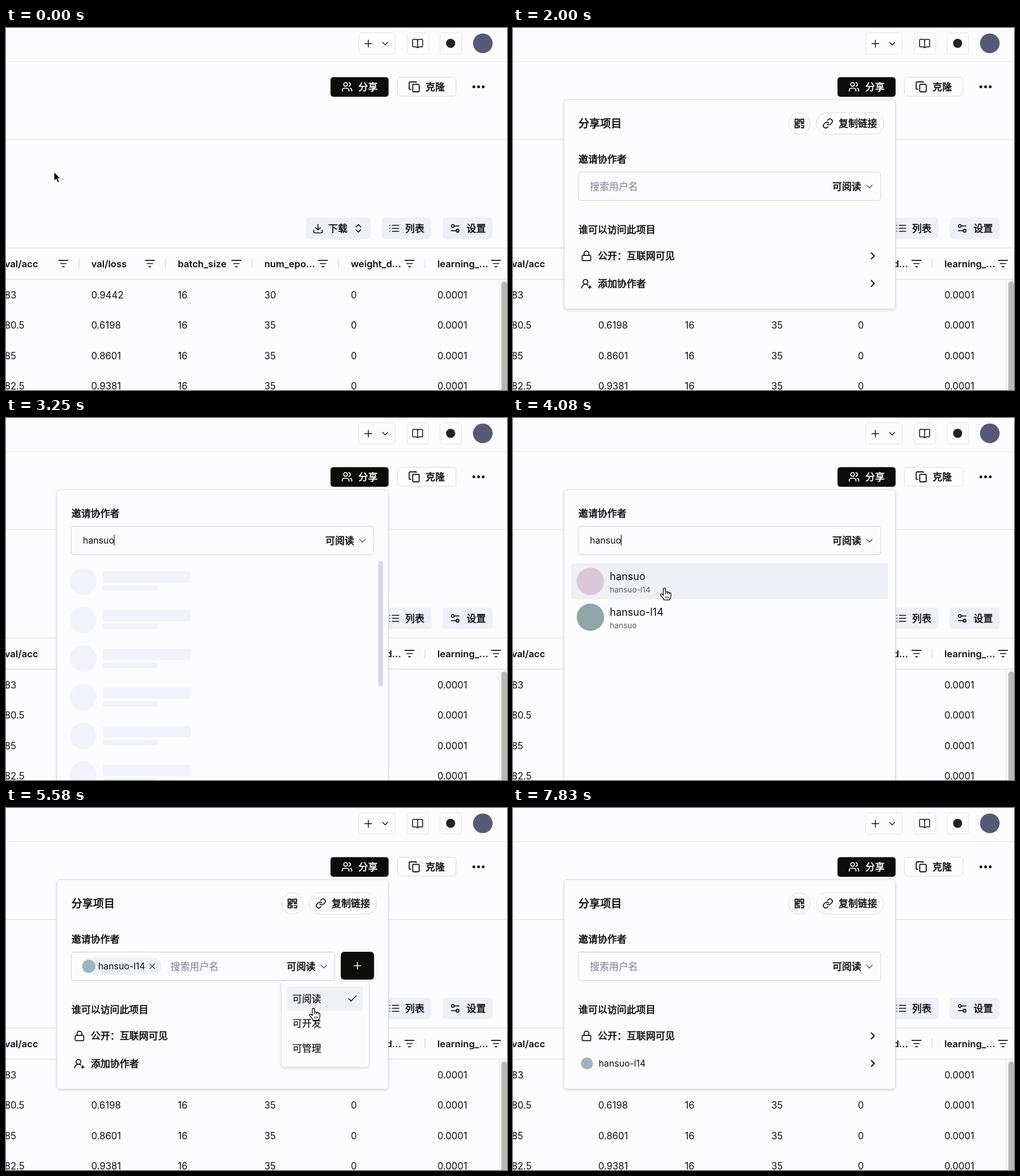
An HTML page that plays this animation: 880x637 px, repeating every 8410 ms.

```html
<!DOCTYPE html>
<html lang="zh-CN">
<head>
<meta charset="utf-8">
<title>分享项目</title>
<style>
html, body { margin: 0; width: 100%; height: 100%; overflow: hidden; background: #fcfcfe; }
svg { display: block; position: fixed; left: 0; top: 0; }
text { font-family: Inter, "Noto Sans CJK SC", "Noto Sans CJK", sans-serif; white-space: pre; }
.pop { filter: drop-shadow(0 2px 2px rgba(40, 40, 90, .15)); }
</style>
</head>
<body>
<svg id="stage" width="880" height="637" viewBox="0 0 880 637" lang="zh-CN"></svg>
<script>
const LOOP = 8410, STEP = 1000 / 12;
const USER = 'hansuo', USER2 = 'hansuo-l14';
const INK = '#101014', EDGE = '#d9d7e6', SOFT = '#efeff7', GREY = '#8b8b9f', BG = '#fcfcfe', BONE = '#f2f2fc';

const ICONS = {
  plus: 'M5 12h14M12 5v14',
  down: 'M6 9l6 6 6-6',
  right: 'M9 18l6-6-6-6',
  cross: 'M18 6L6 18M6 6l12 12',
  check: 'M20 6L9 17l-5-5',
  book: 'M12 6v14M3 19a1 1 0 0 1-1-1V5a1 1 0 0 1 1-1h6a3 3 0 0 1 3 3 3 3 0 0 1 3-3h6a1 1 0 0 1 1 1v13a1 1 0 0 1-1 1h-6l-3 2-3-2z',
  users: 'M16 21v-2a4 4 0 0 0-4-4H6a4 4 0 0 0-4 4v2M5 7a4 4 0 1 0 8 0a4 4 0 1 0-8 0M22 21v-2a4 4 0 0 0-3-3.9M16 3.1a4 4 0 0 1 0 7.8',
  userAdd: 'M2 21a8 8 0 0 1 13.3-6M5 8a5 5 0 1 0 10 0a5 5 0 1 0-10 0M19 16v6M22 19h-6',
  clone: 'M11 7h9a2 2 0 0 1 2 2v11a2 2 0 0 1-2 2h-9a2 2 0 0 1-2-2V9a2 2 0 0 1 2-2zM5 17H4a2 2 0 0 1-2-2V4a2 2 0 0 1 2-2h12v1',
  load: 'M21 15v4a2 2 0 0 1-2 2H5a2 2 0 0 1-2-2v-4M7 10l5 5 5-5M12 15V3',
  sort: 'M7 15l5 5 5-5M7 9l5-5 5 5',
  list: 'M8 6h13M8 12h13M8 18h13M3 6h.1M3 12h.1M3 18h.1',
  tune: 'M20 7h-10M14 17H4M14 17a3 3 0 1 0 6 0a3 3 0 1 0-6 0M4 7a3 3 0 1 0 6 0a3 3 0 1 0-6 0',
  link: 'M10 13a5 5 0 0 0 7.5.5l3-3a5 5 0 0 0-7-7l-1.8 1.7M14 11a5 5 0 0 0-7.5-.5l-3 3a5 5 0 0 0 7 7l1.8-1.7',
  lock: 'M5 11h14a2 2 0 0 1 2 2v7a2 2 0 0 1-2 2H5a2 2 0 0 1-2-2v-7a2 2 0 0 1 2-2zM7 11V7a5 5 0 0 1 10 0v4',
  filter: 'M2 5h20M6 12h12M10 19h4',
  grid: 'M3 3h6v6H3zM15 3h6v6h-6zM3 15h6v6H3zM12 3v6M3 12h9M12 16v5M16 12h5M16 16h2M21 16v5h-5'
};

const rect = (x, y, w, h, r, fill, stroke = 'none', extra = '') =>
  `<rect x="${x}" y="${y}" width="${w}" height="${h}" rx="${r}" fill="${fill}" stroke="${stroke}" ${extra}/>`;
const disc = (x, y, r, fill, stroke = 'none') =>
  `<circle cx="${x}" cy="${y}" r="${r}" fill="${fill}" stroke="${stroke}"/>`;
// y is the middle of the line; a thin outline gives Chinese text its medium weight
const text = (x, y, s, size = 16.9, weight = 500, fill = INK, id = '') => {
  const han = /[\u4e00-\u9fff]/.test(s);
  const bold = han ? `font-weight="400" stroke="${fill}" stroke-width="${weight > 400 ? size * .035 : .2}"` : `font-weight="${weight}"`;
  return `<text x="${x}" y="${(y + size * .365).toFixed(1)}" font-size="${size}" ${bold} fill="${fill}" ${id && `id="${id}"`}>${s}</text>`;
};
const icon = (name, x, y, size = 20, stroke = INK, line = 1.7) => {
  const k = size / 24;
  return `<path d="${ICONS[name]}" transform="translate(${x - size / 2} ${y - size / 2}) scale(${k})" fill="none" stroke="${stroke}" stroke-width="${line / k}" stroke-linecap="round" stroke-linejoin="round"/>`;
};
const group = (id, body, cls = '') => `<g id="${id}" class="${cls}">${body}</g>`;
const line = (y, c) => rect(0, y, 880, 1, 0, c);

function page() {
  let s = line(58.5, '#e3e3ea') + line(195.5, '#dddae0') + line(386.5, '#dcdce4') + line(441.5, '#d6d4e6');
  for (const [x, w] of [[619.5, 64], [704.5, 38], [762.5, 38]]) s += rect(x, 8.5, w, 37.5, 5, BG, '#e2e1ec');
  s += icon('plus', 636.5, 27.5, 21, INK, 1.5) + icon('down', 666, 27.5, 18, INK, 1.4);
  s += icon('book', 723, 27, 21, INK, 1.5) + disc(781, 27, 8, '#222226') + disc(837.5, 27, 17.3, '#565a78');
  s += rect(570, 86.5, 102, 34.5, 5, '#0c0c0a') + icon('users', 599, 103.5, 20, '#fff') + text(619, 103.5, '分享', 16.9, 500, '#fff');
  s += rect(687.5, 86.5, 103, 33.5, 6, BG, EDGE) + icon('clone', 717, 103.5, 21, INK, 1.8) + text(737, 103.5, '克隆');
  for (const x of [821.8, 830, 838.2]) s += disc(x, 103.5, 2.5, INK);

  for (const [x, w] of [[527, 113.5], [660, 87.5], [767, 87.5]]) s += rect(x, 333.5, w, 38, 6, SOFT);
  s += icon('load', 548, 353, 20) + text(566, 352.5, '下载') + icon('sort', 619, 352.5, 20);
  s += icon('list', 682, 352.5, 21) + text(701, 352.5, '列表') + icon('tune', 789, 352.5, 20) + text(809, 352.5, '设置');

  const heads = ['val/acc', 'val/loss', 'batch_size', 'num_epo...', 'weight_d...', 'learning_...'];
  const cells = [
    ['83', '80.5', '85', '82.5'], ['0.9442', '0.6198', '0.8601', '0.9381'],
    ['16', '16', '16', '16'], ['30', '35', '35', '35'],
    ['0', '0', '0', '0'], ['0.0001', '0.0001', '0.0001', '0.0001']
  ];
  heads.forEach((h, i) => {
    const x = -2.3 + i * 152;
    s += text(x, 415, h, 16.6, 600) + icon('filter', x + 103, 414.5, 19);
    if (i < 5) s += rect(x + 129.5, 406.5, 1.4, 16, 0, '#d5d4dc');
    cells[i].forEach((c, j) => s += text(x, 469.5 + j * 53.5, c, 16.6, 400));
  });
  return s + rect(865.5, 443, 1, 194, 0, '#dddbe6') + rect(870, 446, 10, 220, 5, '#b8b8b2');
}

const picker = (x, y, id) => text(x, y, '可阅读', 16.9, 500, INK, id) + icon('down', x + 65, y + .5, 20, '#55555f', 1.4);
const field = (y, w) => rect(114.5, y, w, 50, 5, BG, '#cfcbe0');
const card = h => rect(89.5, 126, 582, h, 6, BG, EDGE);

function sharePanel() {
  const body = group('card', card(368.5), 'pop')
    + text(115, 168, '分享项目', 19)
    + disc(503, 168, 18.8, BG, EDGE) + icon('grid', 503, 168, 20, INK, 1.8)
    + rect(533, 149, 118, 38, 19, BG, EDGE) + icon('link', 553, 168, 20) + text(572, 168, '复制链接')
    + text(115, 230.5, '邀请协作者')
    + text(115, 355, '谁可以访问此项目')
    + icon('lock', 129, 401, 20) + text(149, 401, '公开：互联网可见')
    + icon('right', 632, 401, 21, INK, 1.9) + icon('right', 632, 449.5, 21, INK, 1.9);
  const empty = field(253.5, 531.5) + text(135, 278.5, '搜索用户名', 16.9, 400, GREY, 'hint')
    + text(135, 278.5, '', 15.9, 400, INK, 'typed') + picker(561, 278.5, 'role');
  const filled = field(253.5, 463) + rect(131, 264, 142, 29, 14.5, SOFT) + disc(145.5, 278.5, 11.5, '#9db4ba')
    + text(162, 278.5, USER2, 15.8, 400) + icon('cross', 257, 278.5, 17, '#444', 1.3)
    + text(289, 278.5, '搜索用户名', 16.9, 400, GREY) + picker(493, 278.5, 'role2')
    + rect(588, 253, 58.5, 49, 6, '#0c0c0a') + icon('plus', 617.3, 277.5, 21, '#fff', 1.5);
  const menu = rect(483.5, 304, 154, 152, 6, BG, '#e0deea', 'class="pop"')
    + rect(493, 314, 134, 43, 4, '#f0f0f7', 'none', 'id="mark"')
    + ['可阅读', '可开发', '可管理'].map((s, i) => text(503, 335.5 + i * 43.7, s, 16.9, 400)).join('')
    + icon('check', 608.5, 335.5, 20);
  return group('share', body + group('empty', empty) + group('filled', filled)
    + group('add', icon('userAdd', 129, 450, 20) + text(149, 449.5, '添加协作者'))
    + group('added', disc(130, 449.5, 10.5, '#9db4ba') + text(150.5, 449.5, USER2, 15.8, 400))
    + group('menu', menu));
}

function searchPanel() {
  let ghost = '';
  for (let i = 0; i < 6; i++) {
    const y = 287.5 + i * 68;
    ghost += disc(135.5, y, 23.5, BONE) + rect(170, y - 17.5, 154, 20, 4, BONE) + rect(170, y + 6.5, 96, 10, 3, BONE);
  }
  const person = (y, a, b, c) => disc(136, y, 24, c) + text(170, y - 9.5, a, 18.1, 400) + text(170, y + 14, b, 13.7, 400, '#5a5a62');
  return group('search', rect(89.5, 126, 582, 560, 6, BG, EDGE, 'class="pop"')
    + text(115, 168, '邀请协作者') + field(190.5, 531.5)
    + text(135, 215.5, '', 15.9, 400, INK, 'query') + picker(561, 215.5, 'role3')
    + group('bones', rect(654, 252, 8, 220, 4, '#d6d6e6') + group('ghost', ghost))
    + group('people', rect(102, 256, 557, 63, 4, '#efeff6', 'none', 'id="hover"')
      + person(287.5, USER, USER2, '#dcc6da') + person(350.5, USER2, USER, '#8fa5a8')));
}

const pointers =
  `<g id="cursor"><path id="arrow" d="M0 0V16.6l3.9-3.6 2.9 6.3 2.8-1.2-2.8-6.1h5z" fill="#000" stroke="#fff" stroke-width="1.2"/>
  <g id="hand" fill="#fff" stroke="#000" stroke-width="1.3" stroke-linejoin="round"><path d="M-2 2C-2-.4 2-.4 2 2V8C2 6 5.4 6 5.4 8.2 5.4 6.6 8.5 6.8 8.5 9 8.5 7.6 11.4 8 11.4 10.2V14c0 3-2 4-2 7H-1c0-3-5-6.2-5.7-8.7-.5-2 2-2.4 3.2-1L-2 13z"/><path d="M2 8v3M5.4 8.5V11M8.5 9v2.4M2 14.5V18M4.6 14.5V18M7.2 14.5V18" stroke-width="1"/></g>
  <path id="beam" d="M-4-10q4 0 4 3V7q0 3-4 3M4-10q-4 0-4 3V7q0 3 4 3" fill="none" stroke="#111" stroke-width="1.2"/></g>`;

document.getElementById('stage').innerHTML = page() + sharePanel() + searchPanel()
  + rect(0, 0, 1.2, 19, 0, INK, 'none', 'id="caret"') + pointers;

const el = {};
document.querySelectorAll('[id]').forEach(n => el[n.id] = n);
const show = (id, on) => { el[id].style.display = on ? '' : 'none'; };
const within = (t, a, b) => t >= a && t < b;

// time, x, y of the pointer tip
const PATH = [
  [0, 84, 253], [330, 625, 132], [420, 625, 132], [580, 618, 104], [830, 618, 104],
  [1330, 128, 278], [3500, 128, 278], [4080, 266, 299], [4250, 258, 342], [4670, 258, 342],
  [5170, 530, 272], [5330, 530, 272], [5580, 540, 352], [5750, 536, 399], [5840, 536, 399],
  [5920, 533, 392], [6000, 533, 392], [6500, 638, 275], [6920, 627, 272], [7340, 627, 272], [7830, 662, 662]
];
const LOOKS = [
  [0, 'arrow'], [500, 'hand'], [920, 'arrow'], [1330, 'beam'], [2000, ''], [3580, 'hand'], [4420, 'arrow'],
  [5080, 'hand'], [7420, 'arrow'], [7830, '']
];
const KEYS = [2080, 2170, 2420, 2580, 2670, 2830];

function tip(t) {
  const i = PATH.findIndex(p => p[0] > t);
  if (i < 0) return PATH[PATH.length - 1].slice(1);
  const [a, x, y] = PATH[i - 1], [b, u, v] = PATH[i];
  let k = (t - a) / (b - a);
  k = k * k * (3 - 2 * k);
  return [x + (u - x) * k, y + (v - y) * k];
}

function draw(ms) {
  const t = Math.floor((ms + 4) / STEP) * STEP + 4;
  const searching = within(t, 2420, 4420), chosen = within(t, 4420, 7000);

  show('share', t >= 830 && !searching);
  const k = Math.min(1, Math.max(0, (t - 750) / 240));
  const z = .95 + .05 * k;
  el.share.setAttribute('opacity', k);
  el.share.setAttribute('transform', `translate(${381 * (1 - z)} ${126 * (1 - z)}) scale(${z})`);

  const word = USER.slice(0, KEYS.filter(n => t >= n).length);
  const typing = within(t, 2080, 4420);
  show('empty', !chosen);
  show('filled', chosen);
  show('hint', !typing);
  el.typed.textContent = typing ? word : '';
  el.query.textContent = word;
  el.role2.textContent = t >= 6170 ? '可开发' : '可阅读';
  show('add', t < 7000);
  show('added', t >= 7000);
  show('menu', within(t, 5250, 6170));
  el.mark.setAttribute('y', t < 5670 ? 314 : 357.5);

  show('search', searching);
  show('bones', t < 3330);
  show('people', t >= 3330);
  el.ghost.setAttribute('opacity', .8 + .2 * Math.cos((t - 3170) * Math.PI / 500));
  show('hover', t >= 3580);

  const [x, y] = tip(t);
  el.hover.setAttribute('y', y < 319 ? 256 : 319);
  show('caret', within(t, 1500, 2000) || within(t, 2080, 3330) || within(t, 3830, 4330));
  const w = word && typing ? (searching ? el.query : el.typed).getComputedTextLength() : 0;
  el.caret.setAttribute('x', 134.4 + w);
  el.caret.setAttribute('y', searching ? 205.5 : 269);

  const look = LOOKS.filter(l => t >= l[0]).pop()[1];
  for (const n of ['arrow', 'hand', 'beam']) show(n, n === look);
  el.cursor.setAttribute('transform', `translate(${x.toFixed(1)} ${y.toFixed(1)})`);
}

const start = performance.now();
function tick() {
  draw((performance.now() - start) % LOOP);
  requestAnimationFrame(tick);
}
tick();
</script>
</body>
</html>
```
